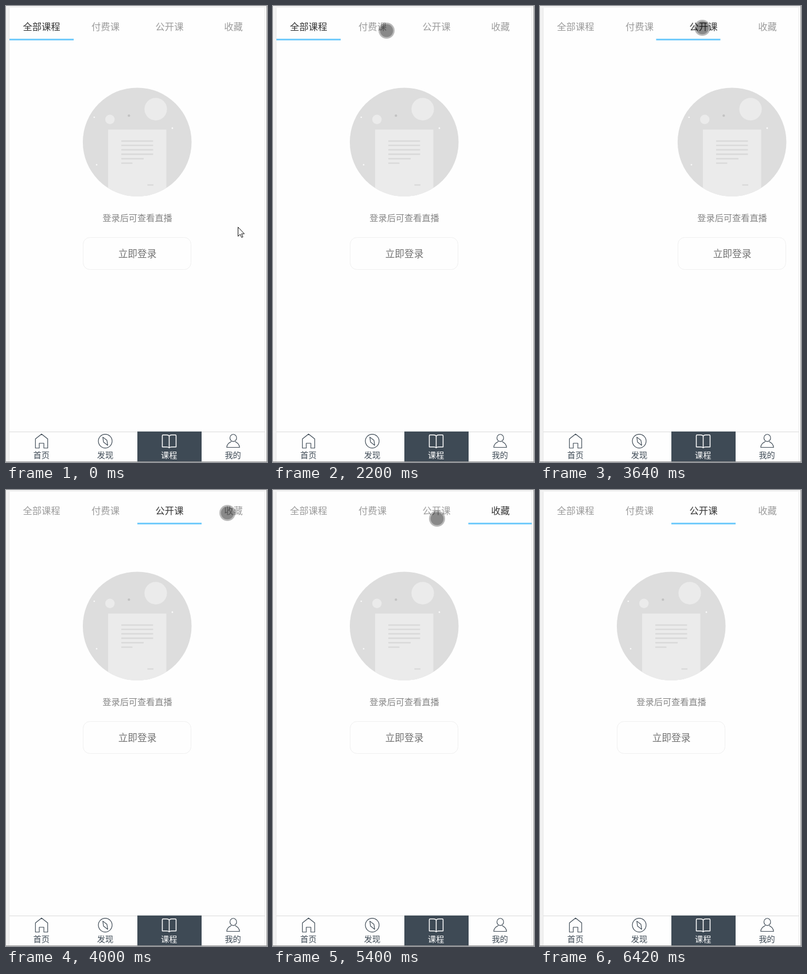
An HTML page for the animation above (7110 ms loop, 455 px wide and 795 px high).

```html
<!DOCTYPE html>
<html lang="zh-CN">
<head>
<meta charset="utf-8">
<style>
html, body { margin: 0; width: 100%; height: 100%; overflow: hidden; background: #fefefe; }
svg { display: block; width: 455px; height: 795px; }
text { font-family: "Noto Sans CJK SC", "Noto Sans CJK", sans-serif; text-anchor: middle; }
.icon { fill: none; stroke: #3e4a55; stroke-width: 1.15; stroke-linejoin: round; }
</style>
</head>
<body>
<svg viewBox="0 0 455 795">
  <defs>
    <clipPath id="view"><rect x="6" y="61" width="445" height="680"/></clipPath>
    <clipPath id="disc"><circle cx="228.7" cy="237.2" r="94.8"/></clipPath>
    <g id="page">
      <g clip-path="url(#disc)">
        <rect x="130" y="140" width="200" height="195" fill="#ddd"/>
        <path d="M178 215.5H279.5V335H178Z" fill="#ebebeb"/>
        <circle cx="261" cy="179.8" r="19.6" fill="#ebebeb"/>
        <circle cx="181.2" cy="197.8" r="8.2" fill="#ebebeb"/>
        <path d="M201 235.5h55.5M201 243h55.5M201 250.7h55.5M201 258.4h55.5M201 266.2h39M201 274h19.5M246.5 312h10.5" stroke="#dadada" stroke-width="2.6"/>
        <circle cx="214.3" cy="191.2" r="2.1" fill="#c2c2c2"/>
        <g fill="#fafafa">
          <circle cx="290" cy="213" r="1.4"/>
          <circle cx="153.8" cy="194" r="1.3"/>
          <circle cx="158" cy="276.7" r="1.3"/>
        </g>
      </g>
      <text x="229" y="374.7" font-size="15.2" fill="#868686">登录后可查看直播</text>
      <rect x="134.5" y="403.5" width="188" height="56" rx="12" fill="none" stroke="#f0f0f0"/>
      <text x="229" y="437.7" font-size="16.7" fill="#737373">立即登录</text>
    </g>
  </defs>

  <rect width="455" height="795" fill="#fefefe"/>
  <path d="M0 0H455V3H6V795H0Z" fill="#f2f2f2"/>
  <path d="M5.5 3V795M451.5 3V795" stroke="#e6e6e6"/>

  <g id="pages" clip-path="url(#view)"></g>
  <g id="tabs" font-size="16.3"></g>
  <rect id="bar" y="57" width="112" height="3" fill="#74ccfb"/>

  <path d="M6 742.5H451" stroke="#dcdcdc"/>
  <rect x="229" y="741.8" width="112" height="52.2" fill="#3e4a55"/>
  <g class="icon">
    <path d="M51.3 754.7L62 746.2L72.7 754.7V770.7H66V762.2H58V770.7H51.3Z"/>
    <circle cx="173" cy="758.6" r="12"/>
    <path d="M168.8 751.6L176 757.3L177.3 766L170 760.2Z"/>
    <path d="M284.5 749.8Q283 747.8 280 747.8H274Q272.5 747.8 272.5 749.3V768.8H280Q283 768.8 284.5 770.3Q286 768.8 289 768.8H296.5V749.3Q296.5 747.8 295 747.8H289Q286 747.8 284.5 749.8V770" stroke="#fff" stroke-width="1.5"/>
    <ellipse cx="396.2" cy="753" rx="5.8" ry="6.3"/>
    <path d="M393 759.3C389 761.5 385.4 763.5 384.8 769.5H407.2C406.6 763.5 403 761.5 399.4 759.3"/>
  </g>
  <g id="nav" font-size="14.2"></g>
  <path d="M0 794.5H455M454.5 0V795" stroke="#9a9a9a"/>

  <g id="touch">
    <circle r="14" fill="#000" fill-opacity=".27"/>
    <circle r="11.3" fill="#000" fill-opacity=".26"/>
  </g>
  <path id="arrow" d="M.5 .5V16.5L4.2 13L6.8 18.5L9 17.5L6.6 12.1H11.5Z" fill="#fff" stroke="#111"/>
</svg>
<script>
const LOOP = 7110, TAB = 111.5, WIDTH = 446, STEP = 140;
const TOUCH_ON = 410, TOUCH_OFF = 6270, ARROW_OFF = 6420;
const $ = id => document.getElementById(id);

function add(parent, tag, attrs, text = '') {
  const el = document.createElementNS('http://www.w3.org/2000/svg', tag);
  for (const key in attrs) el.setAttribute(key, attrs[key]);
  el.textContent = text;
  return parent.appendChild(el);
}

const tabs = ['全部课程', '付费课', '公开课', '收藏'].map((label, i) =>
  add($('tabs'), 'text', { x: 62 + i * TAB, y: 42 }, label));
const pages = tabs.map(() => add($('pages'), 'use', { href: '#page' }));
['首页', '发现', '课程', '我的'].forEach((label, i) =>
  add($('nav'), 'text', { x: 61.7 + i * 111.3, y: 788.3, fill: i === 2 ? '#fff' : '#3e4a55' }, label));

// Turning points of the pointer: time, x, y
const path = [
  [TOUCH_ON, 378, 383], [530, 441, 488], [800, 341, 405], [1080, 150, 360], [1220, 97, 371],
  [1500, 272, 311], [1770, 136, 290], [2050, 212, 75], [2200, 198, 43], [2510, 200, 40],
  [2630, 200, 40], [2910, 270, 47], [3190, 283, 41], [3640, 283, 38], [4000, 386, 40],
  [4430, 386, 40], [5000, 386, 40], [5250, 295, 50], [5400, 286, 50], [5680, 286, 50],
  [6120, 335, 781], [TOUCH_OFF, 335, 781]
];

// Tab changes: start, duration, from, to
const slides = [[2397, 350, 0, 1], [3452, 375, 1, 2], [4325, 280, 2, 3], [5578, 280, 3, 2]];

// cubic-bezier(.35, 0, .25, 1)
function ease(x) {
  let lo = 0, hi = 1;
  for (let i = 0; i < 24; i++) {
    const s = (lo + hi) / 2, r = 1 - s;
    if (1.05 * r * r * s + 0.75 * r * s * s + s ** 3 < x) lo = s; else hi = s;
  }
  return lo * lo * (3 - 2 * lo);
}

// Every leg of the path is shown in equal steps of about STEP ms.
function sample(now) {
  const i = path.findLastIndex(point => point[0] <= now);
  const a = path[i], b = path[i + 1];
  if (!a || !b) return [now, 0, 0];
  const count = Math.max(1, Math.round((b[0] - a[0]) / STEP));
  const k = Math.floor((now - a[0]) / (b[0] - a[0]) * count + 1e-6) / count;
  return a.map((value, j) => value + (b[j] - value) * k);
}

function show(el, visible, x, y) {
  el.setAttribute('visibility', visible ? 'visible' : 'hidden');
  el.setAttribute('transform', `translate(${Math.round(x)} ${Math.round(y)})`);
}

function draw(now) {
  const [t, x, y] = sample(now);
  const before = now < TOUCH_ON, after = now >= TOUCH_OFF;
  show($('touch'), !before && !after, x, y);
  show($('arrow'), before || (after && now < ARROW_OFF), before ? 404 : 199, before ? 385 : 628);

  let pos = 0, current = 0;
  for (const [start, length, from, to] of slides) {
    if (t < start) break;
    pos = from + (to - from) * ease(Math.min(1, (t - start) / length));
    current = to;
  }
  pages.forEach((page, i) => page.setAttribute('x', Math.round((i - pos) * WIDTH)));
  tabs.forEach((tab, i) => tab.setAttribute('fill', i === current ? '#333' : '#9b9b9b'));
  $('bar').setAttribute('x', 6 + pos * TAB);
  $('bar').setAttribute('width', Math.min(112, 445 - pos * TAB));
}

const begin = performance.now();
function tick() {
  draw((performance.now() - begin) % LOOP);
  requestAnimationFrame(tick);
}
tick();
</script>
</body>
</html>
```
